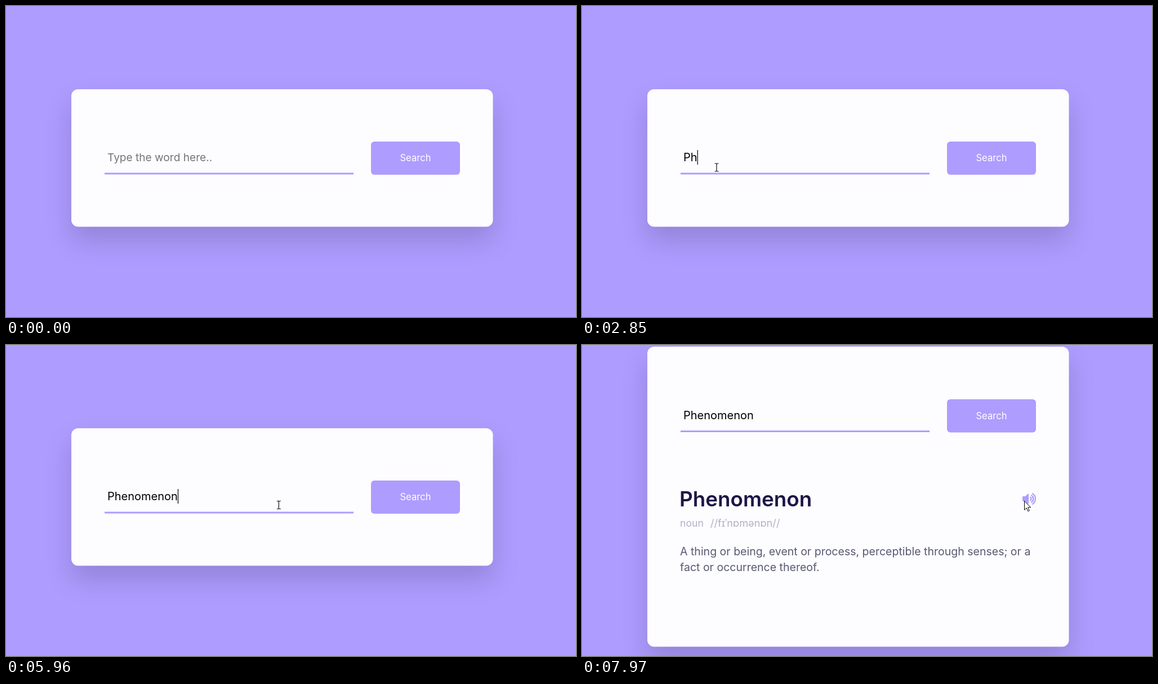
Write an HTML page that moves like this. It is 1012x553 px and loops after 8000 ms.

```html
<!DOCTYPE html>
<html lang="en">
<head>
<meta charset="utf-8">
<title>Dictionary search</title>
<style>
  html, body { margin: 0; width: 100%; height: 100%; overflow: hidden; background: #ae9cff; }
  svg { display: block; width: 100vw; height: 100vh; }
  text { font-family: Inter, "Open Sans", sans-serif; }
  .shade { fill: #26213d; opacity: .2; filter: blur(23.5px); }
  .accent { fill: #ae9cff; }
  .soft { fill: #b3b0c6; }
  .meaning { fill: #575a70; font-size: 19.52px; }
</style>
</head>
<body>
<svg viewBox="0 0 1012 553">
  <rect width="1012" height="553" class="accent"/>
  <rect id="shade" class="shade" x="116" width="748.5" rx="12"/>
  <rect id="card" x="116" width="748.5" rx="12" fill="#fdfcff"/>
  <g id="form">
    <rect class="accent" x="175" y="296.5" width="442" height="3"/>
    <text id="field" x="180" y="276"></text>
    <rect id="caret" y="256" width="1.2" height="26"/>
    <rect class="accent" x="648" y="241" width="158" height="59" rx="6"/>
    <text x="727" y="276" font-size="16.6" fill="#fff" text-anchor="middle">Search</text>
  </g>
  <g id="result">
    <text x="173" y="287" font-size="36.8" font-weight="600" fill="#1c1646">Phenomenon</text>
    <text class="soft" x="174" y="323" font-size="17.7">noun</text>
    <text class="soft" x="228" y="323" font-size="18.2">//fɪˈnɒmənɒn//</text>
    <text class="meaning" x="174" y="373.5">A thing or being, event or process, perceptible through senses; or a</text>
    <text class="meaning" x="174" y="401.5">fact or occurrence thereof.</text>
    <path class="accent" d="M783.2 269h4l4.6-4.4q1.2-.8 1.2.6v16.6q0 1.4-1.2.6l-4.6-4.4h-4q-1.2 0-1.2-1.2v-6.6q0-1.2 1.2-1.2z"/>
    <path fill="none" stroke="#ae9cff" stroke-width="2.2" stroke-linecap="round"
      d="M796 270.7a3.2 3.2 0 0 1 0 5.6M798 267.4a7.2 7.2 0 0 1 0 12.2M800 264.2a11.2 11.2 0 0 1 0 18.6"/>
  </g>
  <path id="arrow" d="M.5.5v15.8l3.7-3.5 2.6 5.8 2.5-1.1-2.6-5.7h5z" fill="#fff" stroke="#000" stroke-linejoin="round"/>
  <path id="beam" d="M-3.5-7h2.5l1 1 1-1h2.5M0-6v12M-3.5 7h2.5l1-1 1 1h2.5" fill="none" stroke="#111" stroke-width="1.2"/>
</svg>
<script>
const LOOP = 8000, ENTER = 130, FOCUS = 1240, FOUND = 6945, BLINK = 530;
const WORD = "Phenomenon";
const KEYS = [2690, 2810, 3040, 3260, 3600, 3820, 4080, 4440, 4660, 4900];

// Pointer stops: time, x, y
const STOPS = [
  [130, 316, 520], [880, 239, 287], [5480, 239, 287], [6440, 728, 282],
  [7520, 728, 282], [7730, 822, 269], [7970, 785, 277], [8000, 785, 277]
];

const $ = id => document.getElementById(id);
const ease = p => p * p * (3 - 2 * p);

function pointer(t) {
  const i = Math.max(1, STOPS.findIndex(s => s[0] > t));
  const [t0, x0, y0] = STOPS[i - 1], [t1, x1, y1] = STOPS[i];
  const p = ease((t - t0) / (t1 - t0));
  return [x0 + (x1 - x0) * p, y0 + (y1 - y0) * p];
}

function show(el, on) {
  el.setAttribute("visibility", on ? "visible" : "hidden");
}

function drawCard(found) {
  const y = found ? 3 : 148, h = found ? 533.5 : 244.5;
  $("card").setAttribute("y", y);
  $("card").setAttribute("height", h);
  $("shade").setAttribute("y", y + 24);
  $("shade").setAttribute("height", h);
  $("form").setAttribute("transform", `translate(0 ${found ? -144.5 : 0})`);
  show($("result"), found);
}

function drawField(t, found) {
  const typed = KEYS.filter(k => k <= t).length;
  const field = $("field");
  field.textContent = typed ? WORD.slice(0, typed) : "Type the word here..";
  field.setAttribute("fill", typed ? "#000" : "#757575");
  field.setAttribute("font-size", typed ? 20 : 19.1);
  const since = t - (typed ? KEYS[typed - 1] : FOCUS);
  $("caret").setAttribute("x", 180 + (typed ? field.getComputedTextLength() : 0));
  show($("caret"), since >= 0 && !found && Math.floor(since / BLINK) % 2 === 0);
}

function drawPointer(t, found) {
  const [x, y] = pointer(t);
  const inField = !found && x > 175 && x < 617 && y > 241 && y < 300;
  const at = `translate(${x.toFixed(1)} ${y.toFixed(1)})`;
  $("arrow").setAttribute("transform", at);
  $("beam").setAttribute("transform", at);
  show($("arrow"), t >= ENTER && !inField);
  show($("beam"), t >= ENTER && inField);
}

function draw(t) {
  const found = t >= FOUND;
  drawCard(found);
  drawField(t, found);
  drawPointer(t, found);
}

const start = performance.now();
function tick(now) {
  draw(Math.max(0, now - start) % LOOP);
  requestAnimationFrame(tick);
}
draw(0);
requestAnimationFrame(tick);
</script>
</body>
</html>
```
